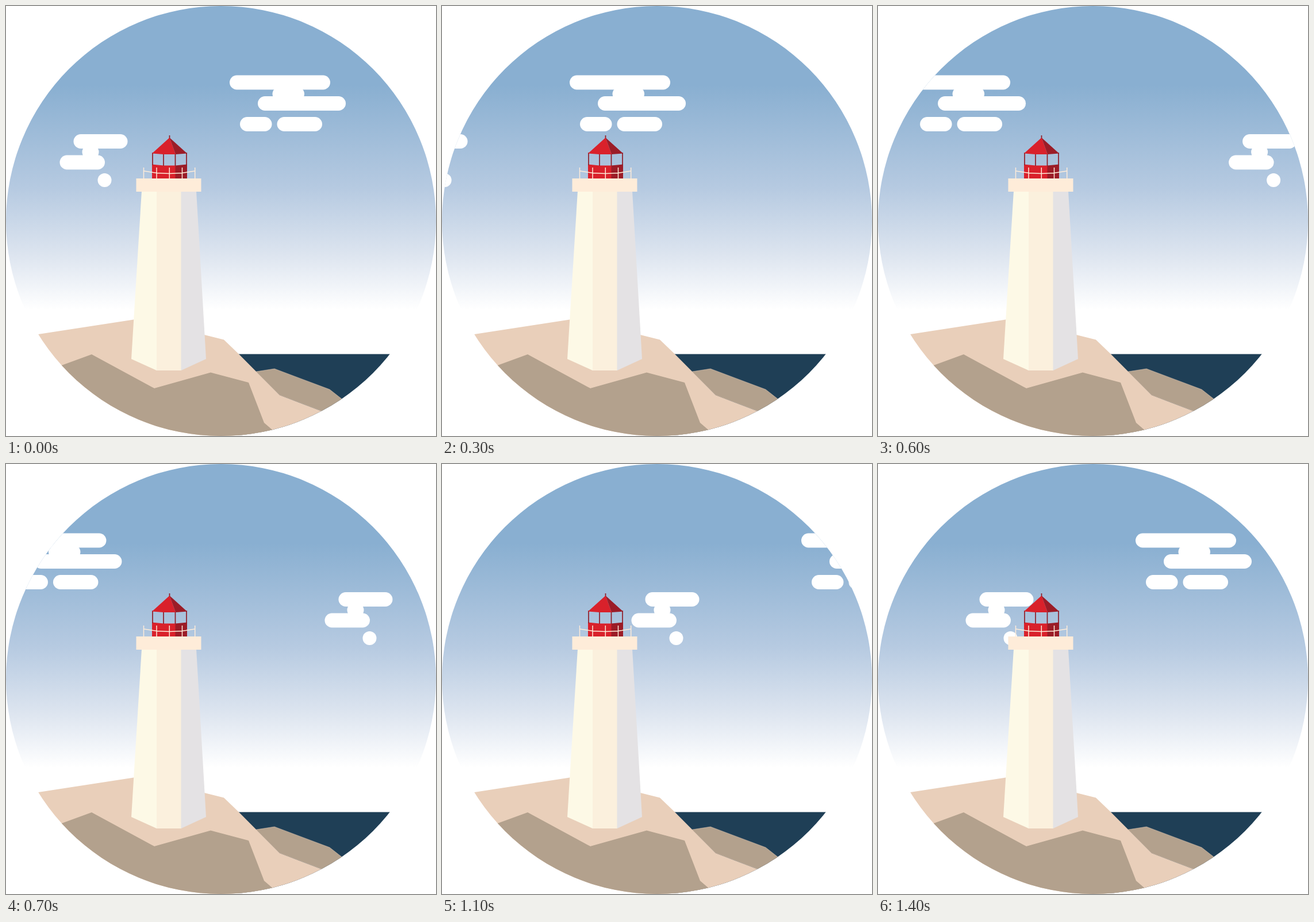
An HTML page that plays this animation: 748x748 px, repeating every 1500 ms.

```html
<!DOCTYPE html>
<html lang="en">
<head>
<meta charset="utf-8">
<title>Lighthouse</title>
<style>
  html, body { margin: 0; width: 100%; height: 100%; overflow: hidden; background: #fff; }
  svg { display: block; width: 100vw; height: 100vh; }
</style>
</head>
<body>
<svg viewBox="0 0 748 748">
  <defs>
    <clipPath id="disc"><circle cx="374" cy="374" r="374"/></clipPath>
    <linearGradient id="sky" gradientUnits="userSpaceOnUse" x1="0" y1="138" x2="0" y2="528">
      <stop offset="0" stop-color="#89afd1"/>
      <stop offset=".46" stop-color="#b6cae1"/>
      <stop offset=".75" stop-color="#dce4ef"/>
      <stop offset="1" stop-color="#fff"/>
    </linearGradient>
    <g id="small">
      <rect x="117.5" y="223" width="94" height="25" rx="12.5"/>
      <rect x="132.5" y="241.5" width="29" height="25" rx="12.5"/>
      <rect x="93.5" y="259.5" width="78.5" height="25" rx="12.5"/>
      <circle cx="171.5" cy="303" r="12"/>
    </g>
  </defs>

  <circle cx="374" cy="374" r="374" fill="url(#sky)"/>

  <g clip-path="url(#disc)">
    <g id="clouds" fill="#fff">
      <rect x="389" y="120.5" width="175" height="25" rx="12.5"/>
      <rect x="463.5" y="140.5" width="55.5" height="25" rx="12.5"/>
      <rect x="438" y="157" width="153" height="25" rx="12.5"/>
      <rect x="407" y="193" width="55.5" height="25" rx="12.5"/>
      <rect x="471.5" y="193" width="78.5" height="25" rx="12.5"/>
      <use href="#small"/>
      <use href="#small" x="850.5"/>
    </g>

    <path fill="#1f3f56" d="M400 605.5H748V748H400Z"/>
    <path fill="#e9cfba" d="M40 573.5 222 545.5 260 541 345 572 379 580.5 405 605.5 476 677 560 709V748H40Z"/>
    <path fill="#b3a18d" stroke="#e9cfba" stroke-width=".5" d="M435 636 467 631 563 667 600 696V724L550 705 476 677Z"/>
    <path fill="#b3a18d" d="M80 631 97 625 149 606 258 665 356 637.5 422 655 449 725 463 737 477 748H80Z"/>
  </g>

  <path fill="#fdf9e6" d="M236 322H262.5V634H262L218 614Z"/>
  <path fill="#fbf0dd" d="M262 322H305V634H262Z"/>
  <path fill="#e4e2e4" d="M304.5 322H331L348 614 304.5 634Z"/>

  <path fill="#d9212b" d="M254 275.5 274 277.5H295V301H254Z"/>
  <path fill="#9b1c27" d="M294.5 277.5 315 275.5V301H294.5Z"/>
  <path fill="none" stroke="#8f1d27" stroke-width="1.7" d="M255 255V277M274 257V278M294.5 257V278M314 255V277M284.5 225V232"/>
  <path fill="#d9212b" d="M284.5 229 254 256.5 274 258H295Z"/>
  <path fill="#9b1c27" d="M284.5 229 315 256.5 295 258Z"/>

  <path fill="#feecd9" d="M226.5 300H339.5V323H226.5Z"/>
  <path fill="none" stroke="#feecd9" stroke-width="1.5" d="M239.5 281V300M262 281V300M284.3 281V300M306.5 281V300M328.7 281V300M239.5 287 262 290.5 284.3 291.5 306.5 290.5 328.7 287"/>
</svg>
<script>
  const STEP = 100, COUNT = 15, TURN = 8;
  const clouds = document.getElementById('clouds');

  // Drift out to the left, then come back in from the right.
  const offset = n => n < TURN ? -55.65 * n : 59 * (COUNT - n);

  function draw() {
    const n = Math.floor(performance.now() / STEP) % COUNT;
    clouds.setAttribute('transform', `translate(${offset(n)} 0)`);
    requestAnimationFrame(draw);
  }
  draw();
</script>
</body>
</html>
```
